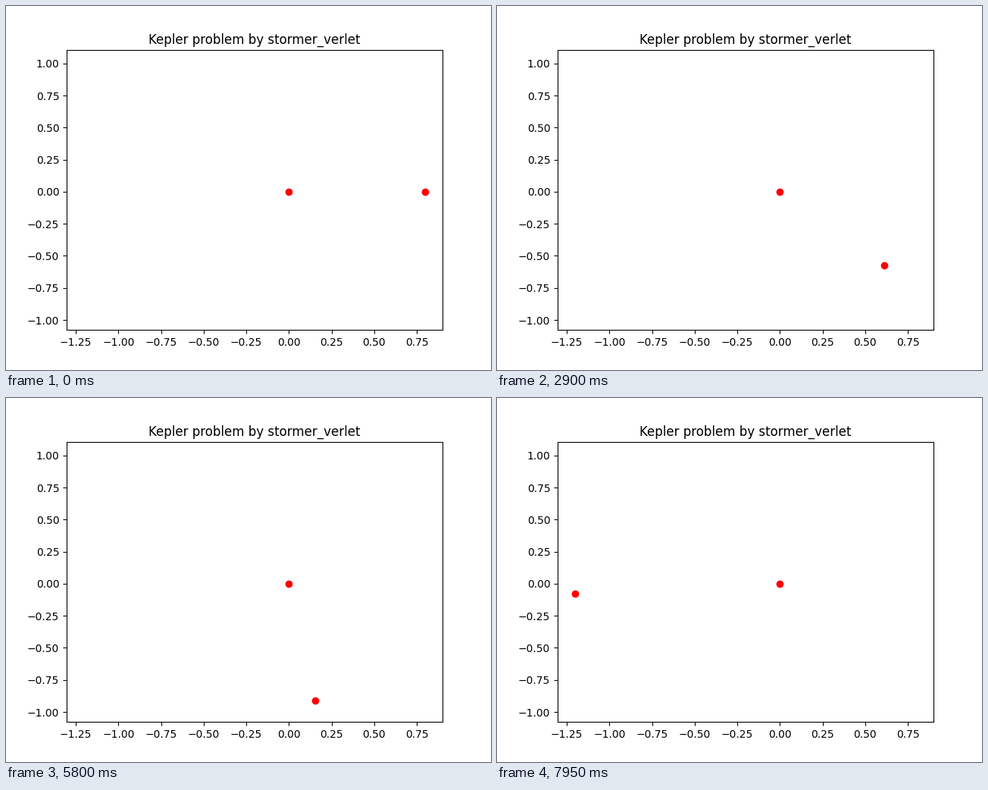
A matplotlib script that plays this animation: 640 px wide and 480 px high, repeating every 8 s.

```python
import numpy as np
import matplotlib.pyplot as plt
from matplotlib.animation import FuncAnimation

FRAMES, INTERVAL = 160, 50
STEPS, H, ECC = 500, 0.1, 0.2


def force(q):
    return -q / np.hypot(*q) ** 3


def stormer_verlet(q, p, h, steps):
    """Positions of the orbit: half drift, kick, half drift."""
    path = [q]
    for _ in range(steps):
        mid = q + h / 2 * p
        p = p + h * force(mid)
        q = mid + h / 2 * p
        path.append(q)
    return np.array(path)


start = np.array([1 - ECC, 0.0])
speed = np.array([0.0, np.sqrt((1 + ECC) / (1 - ECC))])
orbit = stormer_verlet(start, speed, H, STEPS)

plt.rcParams["font.family"] = "DejaVu Sans"
fig, ax = plt.subplots(figsize=(6.4, 4.8), dpi=100)
ax.set_title("Kepler problem by stormer_verlet")

# The whole orbit sets the axis limits, then only two dots are shown.
dots, = ax.plot(orbit[:, 0], orbit[:, 1], "ro")
ax.set_xlim(ax.get_xlim())
ax.set_ylim(ax.get_ylim())


def draw(i):
    dots.set_data([0, orbit[i, 0]], [0, orbit[i, 1]])
    return dots,


anim = FuncAnimation(fig, draw, frames=FRAMES, interval=INTERVAL,
                     init_func=lambda: draw(0), repeat=True, repeat_delay=0)
plt.show()
```
